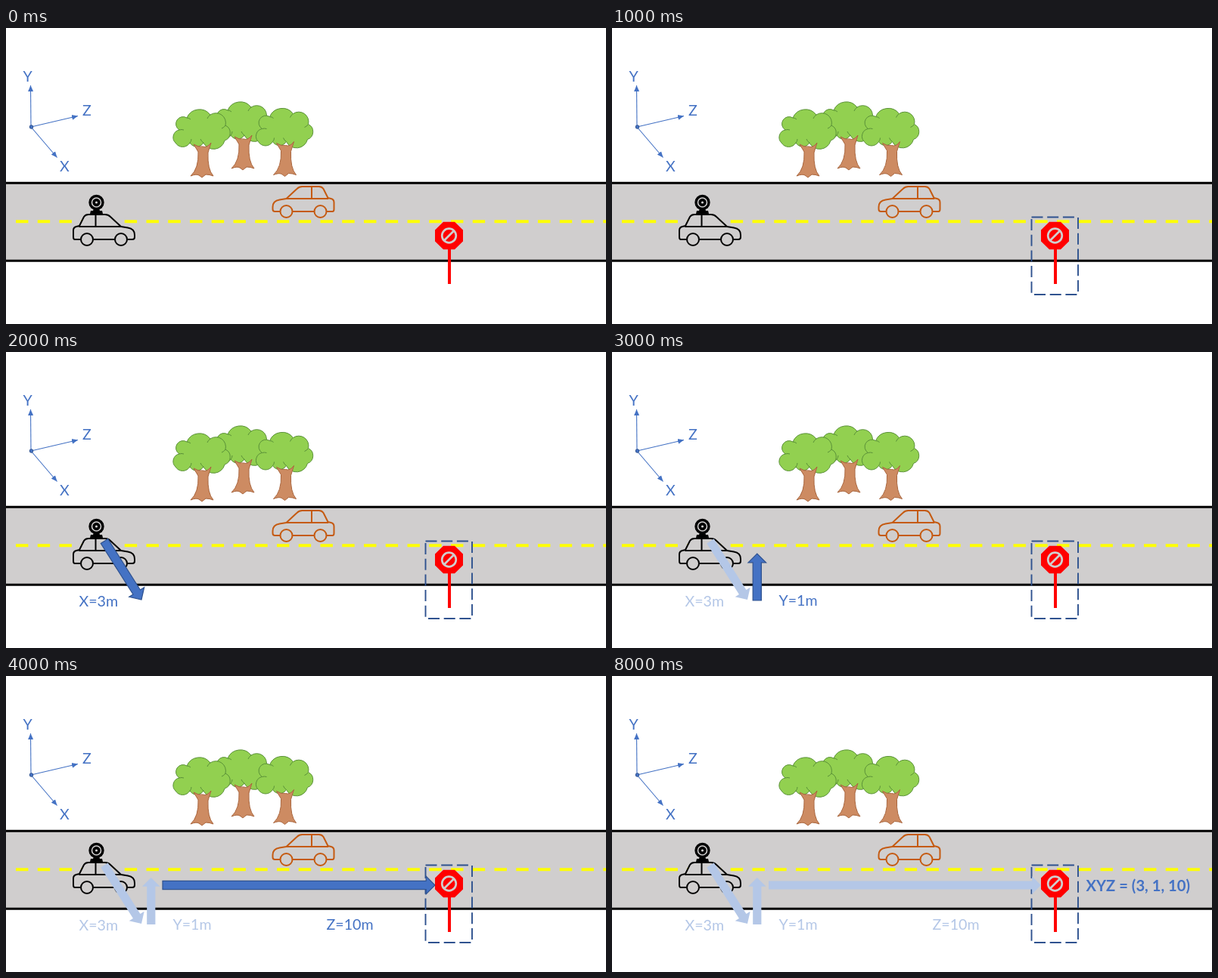
Animation, 793 px wide and 392 px high, one loop 10 s. Source, as an HTML page:

```html
<!DOCTYPE html>
<html lang="en">
<head>
<meta charset="utf-8">
<title>Locating a road sign in camera coordinates</title>
<style>
  html, body { margin: 0; width: 100%; height: 100%; overflow: hidden; background: #fff; }
  svg { display: block; width: 793px; height: 392px; }
  text { font: 19.6px Lato, sans-serif; fill: #4472c4; }
  .bold { font-weight: bold; font-size: 20.2px; }
  .arrow { fill: #4472c4; stroke: #2f528f; stroke-width: 1.2; }
  .past .arrow { fill: #b4c7e7; stroke: none; }
  .past text { fill: #b4c7e7; }
  .axes line { stroke: #4472c4; stroke-width: 1.1; marker-end: url(#tip); }
  .leaf { fill: #92d050; stroke: #5a9138; stroke-width: 1; }
  .crease { fill: none; stroke: #5a9138; stroke-width: 1; }
  .trunk { fill: #cd8b62; stroke: #a9653d; stroke-width: 1; }
  .car { fill: #d0cece; stroke-width: 2; stroke-linejoin: round; stroke-linecap: round; }
</style>
</head>
<body>
<svg viewBox="0 0 793 392">
  <defs>
    <marker id="tip" markerUnits="userSpaceOnUse" markerWidth="9" markerHeight="8" refX="8" refY="4" orient="auto">
      <path d="M0 .5L8 4L0 7.5Z" fill="#4472c4"/>
    </marker>
    <g id="tree">
      <path class="leaf" d="M229 135A9 9 0 0 1 239 119A18 18 0 0 1 270 115A13 13 0 0 1 290 129A10.8 10.8 0 0 1 289 149A15 15 0 0 1 261 152A10.5 10.5 0 0 1 243 152A11 11 0 0 1 224 152A10 10 0 0 1 229 135Z"/>
      <path class="crease" d="M239 119q3 0 5 2M270 115q-3 2-4 5M290 129q-2 3-5 4M229 135q3-1 6 0M243 152q2-2 2-5M261 152q-3-2-4-5"/>
      <path class="trunk" d="M248 154L254 164Q255 186 244 196Q251 193 255 195L259 198L264 194Q269 194 274 196Q266 187 267 165L271 152Q266 159 260 157Q254 158 248 154Z"/>
    </g>
    <g id="car" class="car">
      <path d="M99 280H91Q89 280 89 277V268Q89 264 93 263L97 262L103 250Q105 247 109 247H131Q135 247 138 250L152 263L161 264.5Q170 266 170 274V277Q170 280 167 280Z"/>
      <path d="M97 263H152M118.5 247V263" fill="none"/>
      <circle cx="107" cy="280" r="8"/>
      <circle cx="152" cy="280" r="8"/>
    </g>
  </defs>

  <g class="axes">
    <line x1="33" y1="131" x2="32.5" y2="76"/>
    <line x1="33" y1="131" x2="95" y2="116.5"/>
    <line x1="33" y1="131" x2="67.5" y2="171.5"/>
    <circle cx="33.5" cy="131" r="2.3" fill="#4472c4" stroke="#2f528f"/>
    <text x="22.5" y="71">Y</text>
    <text x="101" y="115.5">Z</text>
    <text x="71" y="189.5">X</text>
  </g>

  <use href="#tree" x="54" y="-10"/>
  <use href="#tree"/>
  <use href="#tree" x="109.5" y="-1.5"/>

  <rect y="205" width="793" height="103" fill="#d0cece"/>
  <path d="M0 205.3H793M0 308.2H793" stroke="#000" stroke-width="3"/>
  <path d="M13 256.2H793" stroke="#ff0" stroke-width="4" stroke-dasharray="16.4 12.35"/>

  <use href="#car" stroke="#000"/>
  <use href="#car" stroke="#c55a11" transform="translate(522.5 -37) scale(-1 1)"/>

  <g>
    <path d="M116 239H123L124 242H127L128 246H111L112 242H115Z"/>
    <circle cx="119.5" cy="231" r="10.2"/>
    <circle cx="119.5" cy="231" r="6" fill="none" stroke="#d0cece" stroke-width="1.6"/>
    <circle cx="119.5" cy="231" r="1.6" fill="#d0cece"/>
  </g>

  <rect data-from="1" x="554.5" y="250.5" width="61.5" height="102.5" fill="none" stroke="#2f528f" stroke-width="1.9" stroke-dasharray="15 5.7"/>

  <g data-from="2" data-past="3">
    <path class="arrow" data-arrow="130 250.5 179 328"/>
    <text x="96.5" y="336.5">X=3m</text>
  </g>
  <g data-from="3" data-past="4">
    <path class="arrow" data-arrow="191.8 329 191.8 267"/>
    <text x="220.5" y="336">Y=1m</text>
  </g>
  <g data-from="4" data-past="5">
    <path class="arrow" data-arrow="207 277 567 277"/>
    <text x="423.5" y="336">Z=10m</text>
  </g>

  <g>
    <path d="M586 292V339" stroke="#f00" stroke-width="4"/>
    <path d="M578 256.7H593L604 267.5V282.5L593 293.3H578L567 282.5V267.5Z" fill="#f00"/>
    <g fill="none" stroke="#d0cece" stroke-width="2.7">
      <circle cx="585.5" cy="275" r="9.3"/>
      <path d="M579 281.5L592 268.5"/>
    </g>
  </g>
  <text class="bold" data-from="5" x="626.5" y="284.5">XYZ = (3, 1, 10)</text>
</svg>
<script>
  const LOOP = 10000, STEP = 1000, LAST_STEP = 5;
  const SHAFT = 5.6, HEAD = 11.8;

  // Block arrow from tail to tip; HEAD is both head length and half width.
  function arrowPath(x1, y1, x2, y2) {
    const length = Math.hypot(x2 - x1, y2 - y1);
    const ux = (x2 - x1) / length, uy = (y2 - y1) / length;
    const at = (along, side) => [x1 + ux * along - uy * side, y1 + uy * along + ux * side];
    const neck = length - HEAD;
    return "M" + [
      at(0, -SHAFT), at(neck, -SHAFT), at(neck, -HEAD), at(length, 0),
      at(neck, HEAD), at(neck, SHAFT), at(0, SHAFT)
    ].join("L") + "Z";
  }

  for (const path of document.querySelectorAll("[data-arrow]")) {
    path.setAttribute("d", arrowPath(...path.dataset.arrow.split(" ").map(Number)));
  }

  const staged = [...document.querySelectorAll("[data-from]")];
  const start = performance.now();

  function draw() {
    const time = (performance.now() - start) % LOOP;
    const step = Math.min(LAST_STEP, Math.floor(time / STEP));
    for (const item of staged) {
      item.style.display = step >= +item.dataset.from ? "" : "none";
      item.classList.toggle("past", step >= +item.dataset.past);
    }
    requestAnimationFrame(draw);
  }
  draw();
</script>
</body>
</html>
```
